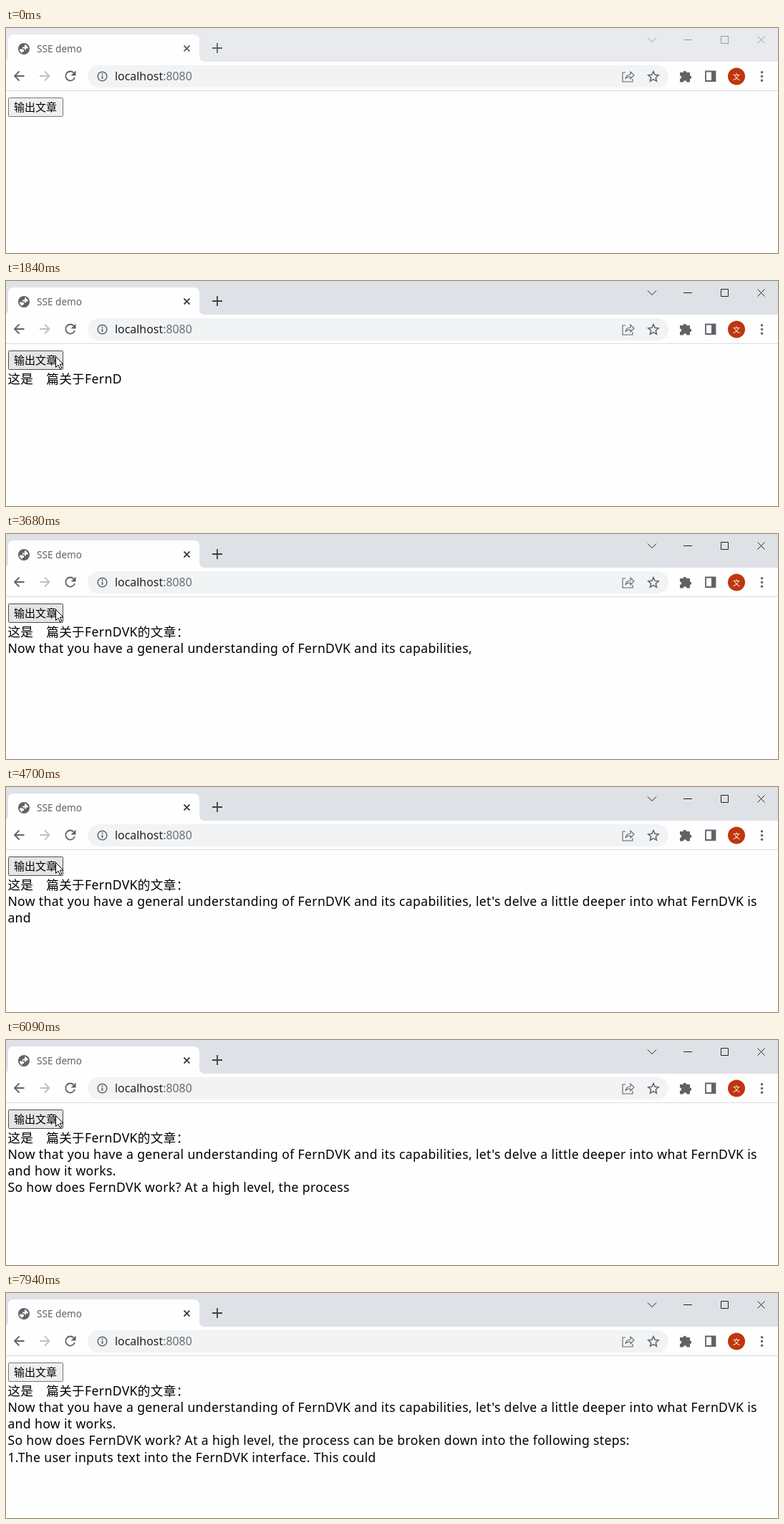
Recreate the animation shown at these times as an HTML page. Size 1078 px wide and 314 px high, loop 8000 ms.

```html
<!DOCTYPE html>
<html lang="zh-CN">
<head>
<meta charset="utf-8">
<title>SSE demo</title>
<style>
  html, body { margin: 0; width: 100%; height: 100%; overflow: hidden; background: #fefefe; }
  svg { display: block; width: 1078px; height: 314px; }
  text { font-family: "Noto Sans", "Noto Sans CJK SC", "Noto Sans CJK", sans-serif; white-space: pre; }
  #article { font-size: 17.6px; letter-spacing: .35px; }
  .line { fill: none; stroke: #5f6368; stroke-width: 1.8; }
  .solid { fill: #5f6368; }
  #strip { fill: #e8eaed; }
  #controls { fill: none; stroke: #999; stroke-width: 1; }
  #tabIcons { stroke: #5f6368; }
  #button rect { fill: #efefef; stroke: #767676; }
  .active #strip { fill: #dee1e6; }
  .active #controls { stroke: #222; }
  .active #tabIcons { stroke: #3c4043; }
  .hover #button rect { fill: #e5e5e5; stroke: #4f4f4f; }
</style>
</head>
<body>
<svg id="stage" viewBox="0 0 1078 314">
  <rect width="1078" height="314" fill="#fefefe"/>

  <!-- tab strip -->
  <rect id="strip" width="1078" height="47"/>
  <path fill="#fefefe" d="M0 47V46Q3 44 3 39V17Q3 9 11 9H262Q270 9 270 17V39Q270 47 278 47Z"/>
  <circle class="solid" cx="25" cy="29" r="8"/>
  <path fill="#fefefe" d="M19 29.5h4q2 0 2 2v1.500h-2v2q-4-1.500-4-5.500zM26 23q4 1 5 5.500h-3v2h-2v-2h-3v-2h3z"/>
  <text class="solid" x="43" y="34" font-size="13.6">SSE demo</text>
  <g id="tabIcons" class="line">
    <path d="M248.5 24.5l8 8m0-8l-8 8M288 28h14M295 21v14"/>
  </g>
  <path id="controls" d="M896 13.5l6 6 6-6M946 16.5h12M998.5 11.5h10v10h-10zM1049.5 11.5l10 10m0-10l-10 10"/>

  <!-- toolbar -->
  <rect y="87" width="1078" height="1" fill="#dadce0"/>
  <path class="line" d="M25.500 67H12m6.500-6.500L12 67l6.500 6.500"/>
  <path class="line" style="stroke:#bdc0c4" d="M47 67h13.5M54 60.500l6.500 6.500-6.500 6.500"/>
  <path class="line" d="M94.500 62.500A6.500 6.500 0 1 0 96 69"/>
  <path class="solid" d="M97.500 59.500v7h-7z"/>
  <rect x="114" y="52" width="811" height="31" rx="15.500" fill="#f1f3f4"/>
  <circle class="line" cx="134.500" cy="67.500" r="6.300" style="stroke-width:1.500"/>
  <path class="solid" d="M133.600 66.500h1.800v4.500h-1.800zM133.600 63.500h1.800v1.800h-1.800z"/>
  <text x="152" y="73" font-size="15.9" fill="#202124">localhost<tspan fill="#6b6f73">:8080</tspan></text>
  <path class="line" style="stroke-width:1.100" d="M865 62h-4v13h14v-4M865 71q1-6 7-6v-4l5 5-5 5v-3q-5 0-7 3z"/>
  <path class="line" style="stroke-width:1.500" d="M904 60.500l2.100 4.800 5.100.5-3.900 3.400 1.200 5.100-4.500-2.700-4.500 2.700 1.200-5.100-3.900-3.400 5.100-.5z"/>
  <path class="solid" d="M941 62h4.500a2.300 2.300 0 0 1 4.600 0H955v4.500a2.300 2.300 0 0 1 0 4.600V75.500h-4.500a2.300 2.300 0 0 0-4.600 0H941V71a2.300 2.300 0 0 0 0-4.600z"/>
  <path class="line" d="M977 60.500h13.500v13.500H977z"/>
  <path class="solid" d="M985 60h6v14.500h-6z"/>
  <circle cx="1020" cy="67.500" r="12" fill="#bf360c"/>
  <text x="1020" y="71.500" font-size="10.500" fill="#fff" text-anchor="middle">文</text>
  <g class="solid">
    <circle cx="1055.500" cy="61.700" r="1.700"/>
    <circle cx="1055.500" cy="67.500" r="1.700"/>
    <circle cx="1055.500" cy="73.300" r="1.700"/>
  </g>

  <!-- page -->
  <g id="button">
    <rect x="3.500" y="97.500" width="76" height="26" rx="1"/>
    <text x="11" y="116" font-size="15">输出文章</text>
  </g>
  <g id="article"></g>
  <path id="cursor" fill="#fff" stroke="#000" d="M.5.5v15l3.500-3.300 2.400 5.300 2.400-1.100-2.400-5.200h4.600z"/>
</svg>
<script>
const LOOP = 8000;
const TOLERANCE = 5;

// Bursts of streamed text: first and last arrival time, then the pieces.
const bursts = [
  [870, 970, "这|是"],
  [1170, 1940, "　篇|关|于|F|e|r|n|D|V"],
  [2040, 2760, "K|的|文|章|：|\nNow| that| you"],
  [2860, 3580, " have| a| general| understanding| of| FernDVK| and| its"],
  [3680, 4400, " capabilities,| let's| delve| a| little| deeper| into| what"],
  [4500, 5270, " FernDVK| is|\nand| how| it| works.|\nSo| how| does"],
  [5370, 6090, " FernDVK| work?| At| a| high| level,| the| process"],
  [6190, 6920, " can| be| broken| down| into| the| following| steps:"],
  [7020, 7740, "\n1.The| user| inputs| text| into| the| FernDVK| interface."],
  [7840, 7940, " This| could"]
];
const pieces = bursts.flatMap(([start, end, words]) =>
  words.split("|").map((text, i, all) =>
    ({ text, time: start + (end - start) * i / (all.length - 1) })));

// Pointer path: time, x, y
const path = [
  [100, 604, 253], [240, 360, 185], [400, 150, 125], [570, 69, 105],
  [6240, 69, 105], [6400, 300, 165], [6600, 730, 232], [6770, 900, 258],
  [6820, 925, 268], [6970, 973, 300], [7020, 980, 314]
];

const stage = document.getElementById("stage");
const cursor = document.getElementById("cursor");
const article = document.getElementById("article");
const rows = Array.from({ length: 5 }, (_, i) => {
  const row = document.createElementNS("http://www.w3.org/2000/svg", "text");
  row.setAttribute("x", 2.4);
  row.setAttribute("y", 142.8 + 23.2 * i);
  return article.appendChild(row);
});

function pointerAt(t) {
  const next = path.findIndex(([time]) => time > t);
  if (next < 1) return null;
  const [t0, x0, y0] = path[next - 1], [t1, x1, y1] = path[next];
  const k = (t - t0) / (t1 - t0);
  return [x0 + (x1 - x0) * k, y0 + (y1 - y0) * k];
}

function draw(t) {
  const lines = pieces.filter(p => p.time <= t + TOLERANCE)
    .map(p => p.text).join("").split("\n");
  rows.forEach((row, i) => row.textContent = lines[i] || "");

  const pointer = pointerAt(t);
  cursor.style.display = pointer ? "" : "none";
  if (pointer) cursor.setAttribute("transform", `translate(${pointer})`);

  const [x, y] = pointer || [-1, -1];
  stage.classList.toggle("hover", x >= 3 && x < 80 && y >= 97 && y < 124);
  stage.classList.toggle("active", t >= 720);
}

const begin = performance.now();
function tick() {
  draw((performance.now() - begin) % LOOP);
  requestAnimationFrame(tick);
}
tick();
</script>
</body>
</html>
```
